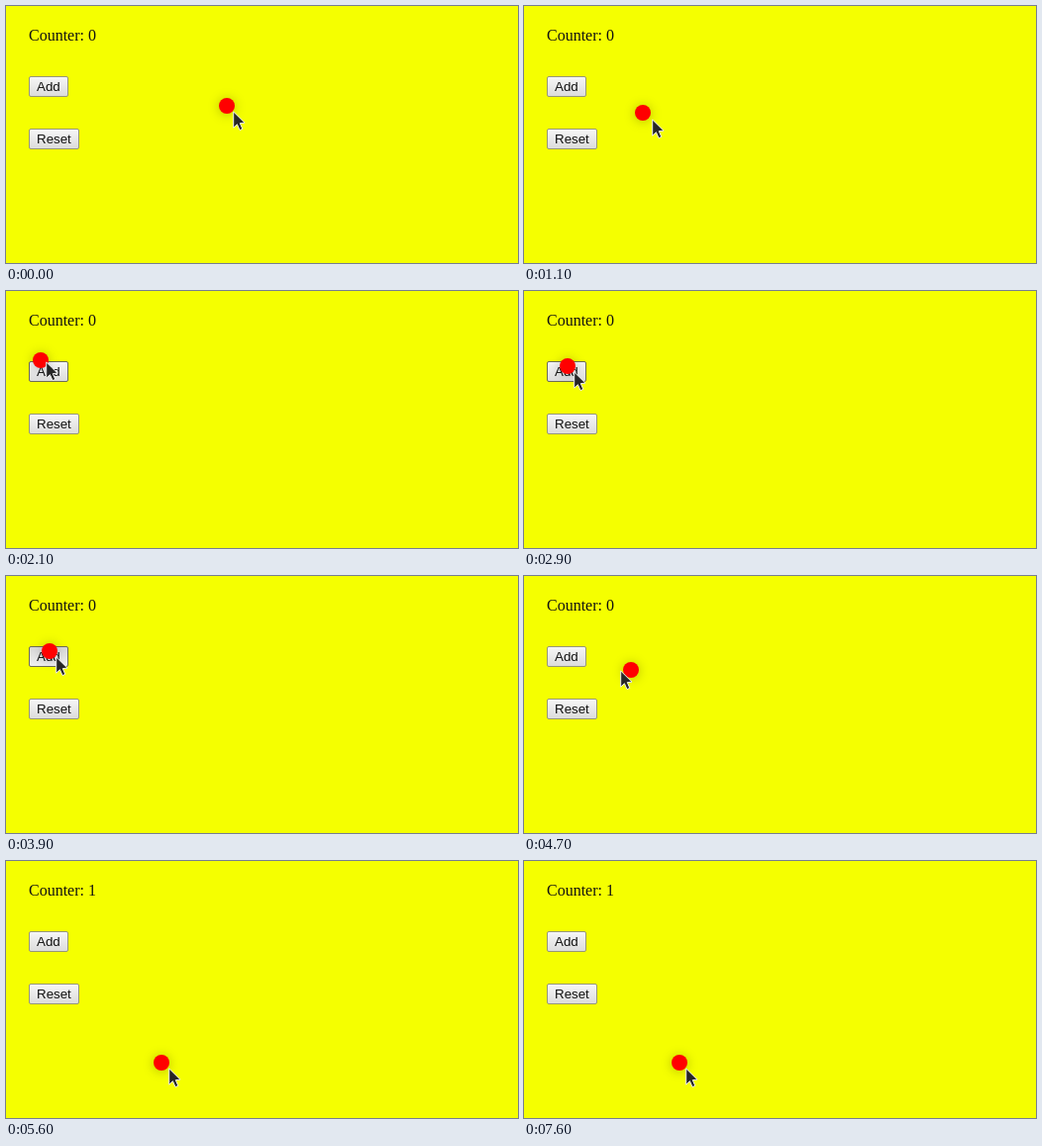
An HTML page for the animation above (8 s loop, 517x260 px).

```html
<!DOCTYPE html>
<html lang="en">
<head>
<meta charset="utf-8">
<title>Counter</title>
<style>
  html, body { margin: 0; width: 100%; height: 100%; overflow: hidden; background: #f5ff00; }
  #stage { position: relative; width: 517px; height: 260px; overflow: hidden; background: #f5ff00; cursor: default; user-select: none; }
  #stage > * { position: absolute; }
  #label { left: 23px; top: 21px; font: 16px/18px "Liberation Serif", "Times New Roman", serif; color: #111; white-space: pre; }
  .btn {
    left: 23px; box-sizing: border-box; height: 21px; padding: 2px 7px;
    border: 1px solid #96967a; border-radius: 2px;
    background: linear-gradient(#f6f6f6, #dcdcdc);
    font: 13.333px/15px "Liberation Sans", Arial, sans-serif; color: #111; white-space: nowrap;
  }
  .btn.hover { border-color: #6c6c58; }
  .btn.down { background: linear-gradient(#d8d8d8, #f0f0f0); }
  #add { top: 71px; width: 40px; }
  #reset { top: 124px; width: 51px; }
  #dot {
    left: -7.5px; top: -7.5px; width: 16px; height: 16px; border-radius: 50%;
    background: #f00; box-shadow: 0 1px 12px rgba(0, 0, 0, .26);
  }
  #arrow { left: 7px; top: 6px; width: 14px; height: 22px; overflow: visible; }
</style>
</head>
<body>
<div id="stage">
  <div id="label">Counter: 0</div>
  <div id="add" class="btn">Add</div>
  <div id="reset" class="btn">Reset</div>
  <div id="dot"></div>
  <svg id="arrow" viewBox="0 0 14 22">
    <path d="M.7 1V17.2L4.4 13.7L7 19.6L9.8 18.4L7.3 12.6L12 12.2Z" fill="#262626" stroke="#eee"/>
  </svg>
</div>
<script>
  const LOOP = 8000, STEP = 100, LAG = 45;

  // Pointer strokes as [time, x, y]; each one starts and ends at rest.
  const strokes = [
    [[200, 222, 100], [500, 229, 135], [800, 190, 131], [1100, 119, 107]],
    [[1100, 119, 107], [1350, 26, 71], [1600, 18, 59], [1850, 28, 44], [2100, 34, 69], [2400, 43, 75]],
    [[4500, 43, 75], [4700, 107, 94], [4900, 172, 114], [5200, 190, 188], [5600, 156, 203]]
  ];
  const presses = [[3200, 3300], [3900, 4200]];
  const countAt = 5200;

  function slope(keys, i, axis) {
    const a = keys[i - 1], b = keys[i + 1];
    return a && b ? (b[axis] - a[axis]) / (b[0] - a[0]) : 0;
  }

  // Smooth cubic through the keys of one stroke.
  function along(keys, t, axis) {
    const next = keys.findIndex(k => k[0] > t);
    if (next < 0) return keys[keys.length - 1][axis];
    if (next === 0) return keys[0][axis];
    const a = keys[next - 1], b = keys[next];
    const span = b[0] - a[0], s = (t - a[0]) / span, r = 1 - s;
    return a[axis] * r * r * (1 + 2 * s) + b[axis] * s * s * (3 - 2 * s)
      + span * s * r * (slope(keys, next - 1, axis) * r - slope(keys, next, axis) * s);
  }

  function pointer(t) {
    const keys = strokes.findLast(k => k[0][0] <= t) || strokes[0];
    return [1, 2].map(axis => Math.round(along(keys, t, axis)));
  }

  const $ = id => document.getElementById(id);
  const label = $("label"), add = $("add"), dot = $("dot"), arrow = $("arrow");
  const place = (el, [x, y]) => el.style.transform = `translate(${x}px, ${y}px)`;

  function isOver(el, x, y) {
    const dx = x - el.offsetLeft, dy = y - el.offsetTop;
    return dx >= 0 && dy >= 0 && dx < el.offsetWidth && dy < el.offsetHeight;
  }

  function draw(time) {
    const t = Math.floor(time / STEP) * STEP;
    const [x, y] = pointer(t - LAG);
    place(dot, pointer(t));
    place(arrow, [x, y]);
    add.classList.toggle("hover", isOver(add, x + 7, y + 6));
    add.classList.toggle("down", presses.some(([a, b]) => t >= a && t < b));
    label.textContent = "Counter: " + (t < countAt ? 0 : 1);
  }

  const origin = performance.now();
  function tick() {
    draw((performance.now() - origin) % LOOP);
    requestAnimationFrame(tick);
  }
  tick();
</script>
</body>
</html>
```
